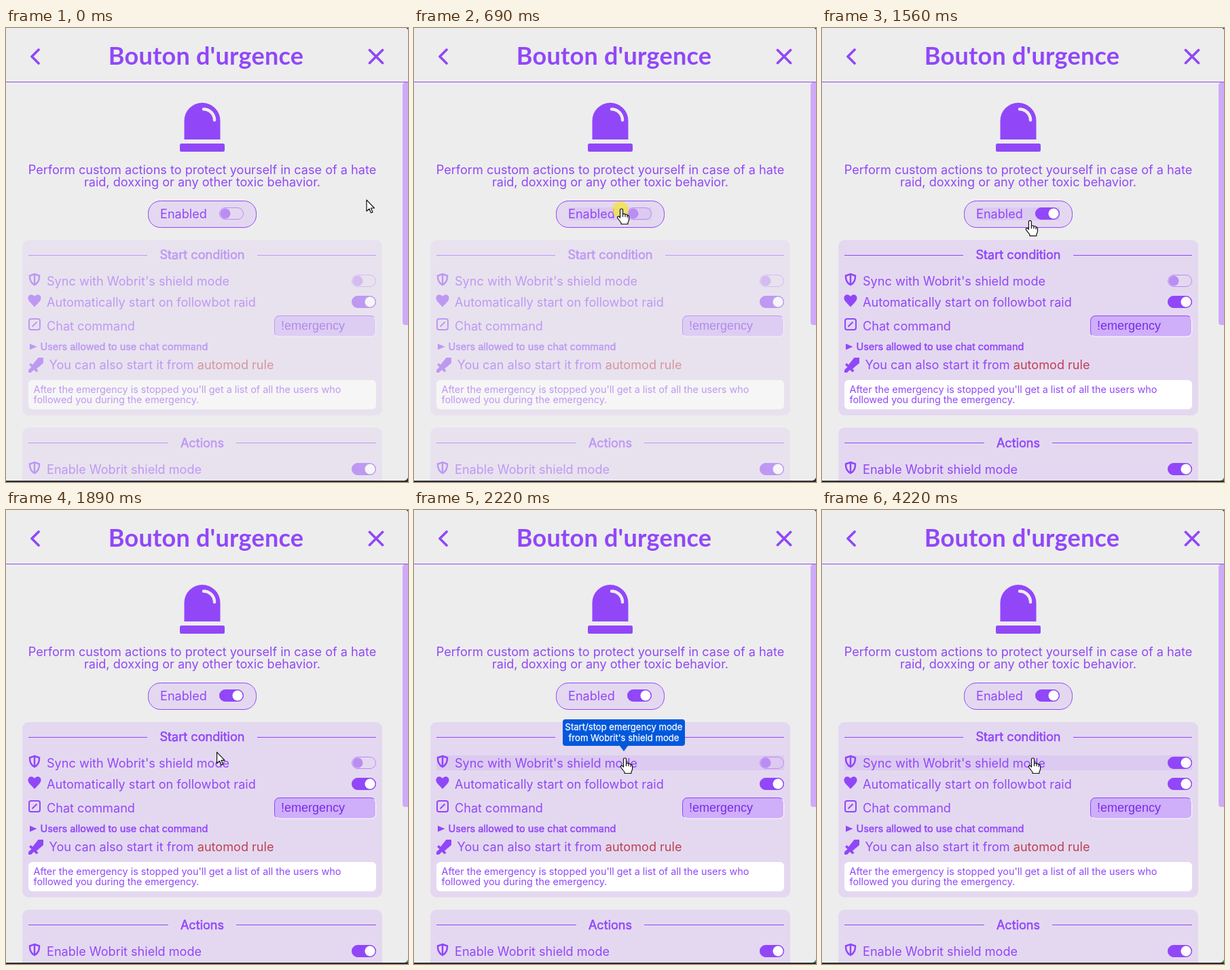
Animation of 592x668 px, one loop 5790 ms. Source, as an HTML page:

```html
<!DOCTYPE html>
<html lang="en">
<head>
<meta charset="utf-8">
<title>Emergency button settings</title>
<style>
  html, body { margin: 0; width: 100%; height: 100%; overflow: hidden; background: #ededed; }
  svg { display: block; font: 18.1px Inter, sans-serif; font-optical-sizing: none; fill: #9147f8; }
  .line { fill: none; stroke: #9147f8; stroke-width: 2; }
  .bold { stroke: #9147f8; stroke-width: .6; }
  .mid { text-anchor: middle; }
  .small { font-size: 14.4px; }
  .panel { fill: #e4d8f1; }
  .hover { fill: #dccaf0; }
  .cursor { fill: #fff; stroke: #111; stroke-width: 1.2; stroke-linejoin: round; }
</style>
</head>
<body>
<svg width="592" height="668" viewBox="0 0 592 668">
  <defs>
    <g id="shield" class="line" style="stroke-width:2.5">
      <path d="M42 362L49 364.500Q49.500 374 42 378Q34.500 374 35 364.500ZM42 362V378"/>
    </g>
  </defs>
  <rect width="592" height="668" fill="#ededed"/>

  <text x="294.500" y="54" class="mid" style="font:700 36px Lato,sans-serif;letter-spacing:.25px">Bouton d'urgence</text>
  <path class="line" style="stroke-width:3.700" stroke-linecap="round" stroke-linejoin="round"
    d="M48 32L38 42L48 52M535.500 32.500L554.500 51.500M554.500 32.500L535.500 51.500"/>
  <rect y="79" width="592" height="1"/>
  <path d="M592 80H588Q584 80 584 84V433Q584 437 588 437H592Z" fill="#cfaaf9"/>

  <path d="M262.500 164V136.500A26.500 26.500 0 0 1 315.500 136.500V164Z"/>
  <rect x="256" y="170" width="66" height="12" rx="2.500"/>
  <path d="M291 119.500A16 16 0 0 1 307 135.500" fill="none" stroke="#ededed" stroke-width="4.500" stroke-linecap="round"/>
  <g class="mid">
    <text x="289" y="215">Perform custom actions to protect yourself in case of a hate</text>
    <text x="289" y="233">raid, doxxing or any other toxic behavior.</text>
  </g>

  <rect x="209.500" y="254.500" width="159" height="39" rx="18" class="panel" stroke="#9147f8"/>
  <rect id="pillHover" class="hover" x="228" y="264" width="122" height="19"/>
  <text x="227" y="280">Enabled</text>
  <g id="mainSwitch"></g>

  <g id="content">
    <rect x="24" y="312" width="530" height="258" rx="9" class="panel"/>
    <rect x="24" y="588" width="530" height="100" rx="9" class="panel"/>
    <path d="M33 334H208v1H33zM370 334H545v1H370zM33 610H239v1H33zM339 610H545v1H339z"/>
    <text x="289" y="340" class="mid bold">Start condition</text>
    <text x="289" y="617" class="mid bold">Actions</text>

    <rect id="rowHover" class="hover" x="33" y="361" width="512" height="22"/>
    <use href="#shield"/>
    <text x="60" y="379">Sync with Wobrit's shield mode</text>
    <g id="syncSwitch"></g>

    <path d="M42 410.500L35 403C28 395 37 388 42 395C47 388 56 395 49 403Z"/>
    <text x="60" y="410">Automatically start on followbot raid</text>
    <g id="raidSwitch"></g>

    <rect class="line" x="34" y="428" width="16" height="16" rx="3"/>
    <path class="line" d="M38.500 439.500L45.500 432.500"/>
    <text x="60" y="445">Chat command</text>
    <rect x="395" y="423" width="150" height="31" rx="8" fill="#cfaefa"/>
    <path class="line" style="stroke-width:1" d="M397.500 452Q395.500 450 395.500 446.500V431.500Q395.500 423.500 403.500 423.500H536.500Q540 423.500 542 425.500"/>
    <path class="line" style="stroke-width:1;stroke:#fff" d="M542 425.500Q544.500 428 544.500 431.500V446.500Q544.500 454 536.500 454H403.500Q400 454 397.500 452"/>
    <text x="405" y="444" fill="#772ce8" style="font:18px Liberation Sans,Arial,sans-serif">!emergency</text>

    <path d="M35 464.500L45.500 469L35 473.500Z"/>
    <text x="50.500" y="474" class="small bold" style="stroke-width:.45">Users allowed to use chat command</text>

    <path d="M55 485V493L45 501.500L47.500 504L45 506.500L41 503L37 507H33V503L37.500 499L34 495.500L36.500 493L39 495.500L47.500 485Z"/>
    <text x="63.500" y="502">You can also start it from <tspan fill="#c0404f">automod rule</tspan></text>

    <rect x="33" y="518" width="512" height="43" rx="6" fill="#fff"/>
    <text x="40.500" y="537" class="small">After the emergency is stopped you'll get a list of all the users who</text>
    <text x="40.500" y="552" class="small">followed you during the emergency.</text>

    <use href="#shield" y="277"/>
    <text x="60" y="656">Enable Wobrit shield mode</text>
    <g id="shieldSwitch"></g>
  </g>

  <g id="tip">
    <path d="M303 347H315L309 355Z" fill="#0058dc"/>
    <rect x="219" y="308" width="180" height="39" rx="4" fill="#0058dc"/>
    <g class="mid" fill="#fff" stroke="#fff" stroke-width=".25" style="font-size:13.100px">
      <text x="309" y="324">Start/stop emergency mode</text>
      <text x="309" y="340">from Wobrit's shield mode</text>
    </g>
  </g>

  <rect y="666" width="592" height="2" fill="#2b2b2d"/>
  <path d="M588 0H592V4Q592 0 588 0Z" fill="#2b2b2d"/>
  <path id="corner" d="M592 661V666H587Q591 665 592 661Z"/>

  <circle id="click" r="12" fill="#f4e436" opacity=".72"/>
  <path id="arrow" class="cursor" d="M0 0V16.500L4 13L6.500 19L9 18L6.500 12H11.500Z"/>
  <path id="hand" class="cursor" d="M-2.500 2Q-2.500 0-.5 0Q1.500 0 1.500 2V8Q4.500 6.600 5 8.600Q8 7.600 8.200 9.600Q10.600 9.200 10.600 12V16Q10.600 18 9 20V22.500H-1V20.500L-6.500 13.500Q-7 11-4.500 11L-2.500 13ZM1.500 8V12M5 9V12M8.200 10V13"/>
</svg>
<script>
const LOOP = 5790;
const el = id => document.getElementById(id);
const set = (id, attrs) => {
  for (const key in attrs) el(id).setAttribute(key, attrs[key]);
};
const show = (id, on) => set(id, { visibility: on ? 'visible' : 'hidden' });
const place = (id, x, y) => set(id, { transform: `translate(${x} ${y})` });
const lerp = (a, b, p) => a + (b - a) * p;

// Progress 0..1 in n jumps, the first at time a and the last at time b.
function steps(t, a, b, n) {
  if (t < a) return 0;
  return Math.min(n, 1 + Math.floor((t - a) * (n - 1) / (b - a))) / n;
}

function makeSwitch(id, x, y) {
  place(id, x, y);
  el(id).innerHTML = `
    <rect x=".5" y=".5" width="35" height="17" rx="8.500" fill="none" stroke="#b98cf2"/>
    <rect class="on" width="36" height="18" rx="9"/>
    <circle cy="9" r="7.500" fill="#ba8df2"/>
    <circle class="on" cy="9" r="7.500" fill="#fff"/>`;
  turn(id, 1);
}

function turn(id, p) {
  el(id).querySelectorAll('.on').forEach(part => part.setAttribute('opacity', p));
  el(id).querySelectorAll('circle').forEach(knob => knob.setAttribute('cx', lerp(9, 27, p)));
}

makeSwitch('mainSwitch', 314, 264);
makeSwitch('syncSwitch', 509, 363);
makeSwitch('raidSwitch', 509, 394);
makeSwitch('shieldSwitch', 509, 640);

function draw(t) {
  const approach = steps(t, 50, 440, 7);
  const enabled = steps(t, 810, 1000, 4);
  const descent = Math.min(1, steps(t, 1560, 2080, 9) * 9 / 7);
  const synced = steps(t, 4030, 4220, 4);

  // Pointer path: arrow to the pill, then down to the first row.
  const glide = approach * approach * (3 - 2 * approach);
  const drop = 1 - (1 - descent) ** 1.25;
  const x = lerp(531, 306, glide) + 5 * drop;
  const y = lerp(253, 266, glide) + 99 * drop;
  const overPill = x < 369 && y < 294;
  const overRow = y > 361;
  const pointing = overPill || overRow;
  show('hand', pointing);
  show('arrow', !pointing);
  place(pointing ? 'hand' : 'arrow', x, y);
  show('pillHover', overPill);
  show('rowHover', overRow);

  show('click', (t >= 690 && t < 810) || (t >= 3960 && t < 4030));
  place('click', x - 2, y + 1);

  turn('mainSwitch', enabled);
  turn('syncSwitch', synced);
  set('content', { opacity: .5 + enabled / 2 });
  set('corner', { fill: enabled ? '#3a7d46' : '#2b2b2d' });

  const shown = t < 2080 ? 0 : t < 2150 ? .6 : t < 2220 ? .87 : 1;
  set('tip', { opacity: shown * (1 - synced) });
  place('tip', 0, shown < .8 ? -2 : shown < 1 ? -1 : 0);
}

const start = performance.now();
function tick() {
  draw((performance.now() - start) % LOOP);
  requestAnimationFrame(tick);
}
tick();
</script>
</body>
</html>
```
